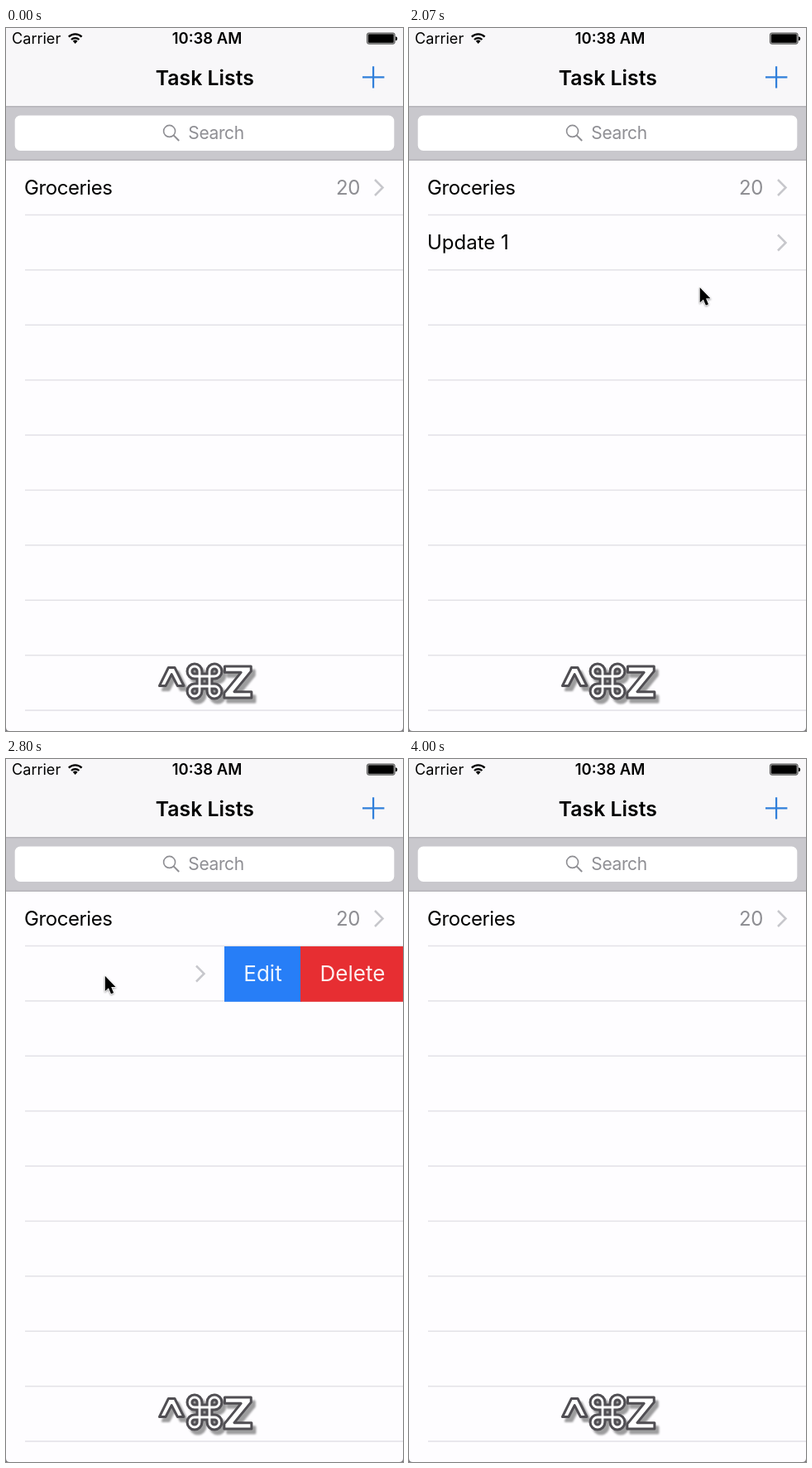
Recreate the animation shown at these times as an HTML page. Size 480 by 848 pixels, loop 4.54 s.

```html
<!DOCTYPE html>
<html lang="en">
<head>
<meta charset="utf-8">
<title>Task Lists</title>
<style>
  html, body { margin: 0; width: 100%; height: 100%; overflow: hidden; background: #fefdff; }
  svg { display: block; width: 100vw; height: 100vh; }
  text { font: 400 24px Inter, Roboto, sans-serif; letter-spacing: -.018em; }
  .title { font-weight: 600; font-size: 24.8px; letter-spacing: 0; }
  .status { font-size: 18.1px; letter-spacing: 0; }
  .clock { font-weight: 600; font-size: 18.5px; }
  .hint { font-size: 21px; fill: #8e8e93; }
  .count { fill: #8e8e93; }
  .action { font-size: 26px; letter-spacing: 0; fill: #fff; fill-opacity: .92; }
  .mid { text-anchor: middle; }
  .end { text-anchor: end; }
  .chevron { fill: none; stroke: #c7c7cc; stroke-width: 2.5; }
  .keys { filter: drop-shadow(4px 5px .8px rgba(0, 0, 0, .38)); }
  .glyph { fill: #fff; stroke: #504e53; stroke-width: 3; stroke-linejoin: round; }
  .keys text { font: 700 52px "DejaVu Sans", sans-serif; letter-spacing: 0; }
  #cursor { filter: drop-shadow(0 1.5px 1.2px rgba(0, 0, 0, .4)); }
</style>
</head>
<body>
<svg viewBox="0 0 480 848" preserveAspectRatio="none">
  <defs>
    <path id="chev" class="chevron" d="M-5 -9.5L4.5 0L-5 9.5"/>
    <clipPath id="reveal"><rect id="gap" x="480" y="220" width="480" height="80"/></clipPath>
  </defs>

  <rect width="480" height="848" fill="#fefdff"/>

  <!-- status and navigation bars -->
  <rect width="480" height="94" fill="#f8f7f9"/>
  <text class="status" x="7" y="19">Carrier</text>
  <g fill="none" stroke="#000" stroke-width="2.3">
    <path d="M75.8 10.6A11.4 11.4 0 0 1 91.6 10.6"/>
    <path d="M79 14A6.8 6.8 0 0 1 88.4 14"/>
  </g>
  <path d="M80.8 15.8A4.2 4.2 0 0 1 86.6 15.8L83.7 19Z"/>
  <text class="status clock mid" x="243" y="19">10:38 AM</text>
  <rect x="436.5" y="6" width="33.6" height="13.2" rx="2" fill="#999" stroke="#555"/>
  <rect x="438" y="7.5" width="30.6" height="10.2" rx="1"/>
  <path d="M471 10.2q2.2 0 2.2 2.5t-2.2 2.5z"/>
  <text class="title mid" x="240.3" y="69">Task Lists</text>
  <path d="M431 59.4H457.4M444.1 46.2V72.6" stroke="#2f7fda" stroke-width="2.2"/>

  <!-- search bar -->
  <rect y="94" width="480" height="66" fill="#c9c8cd"/>
  <path d="M0 94.7H480M0 159.3H480" stroke="#b5b4b9" stroke-width="1.4"/>
  <rect x="10.7" y="105.5" width="458.6" height="42.5" rx="6.5" fill="#fff"/>
  <g fill="none" stroke="#8e8e93" stroke-width="1.6">
    <circle cx="197.6" cy="124.4" r="7"/>
    <path d="M202.6 129.4L209.2 136" stroke-width="2"/>
  </g>
  <text class="hint" x="220.3" y="133.6">Search</text>

  <!-- list -->
  <g id="lines" fill="#e3e2e7"></g>
  <text x="22" y="201">Groceries</text>
  <text class="count end" x="428" y="201">20</text>
  <use href="#chev" x="451" y="192.5"/>

  <g id="row">
    <g clip-path="url(#reveal)">
      <rect x="264" y="226" width="93" height="66.8" fill="#277ef7"/>
      <rect x="356" y="226" width="124" height="66.8" fill="#e72e32"/>
      <text class="action mid" x="310.5" y="268.3">Edit</text>
      <text class="action mid" x="419" y="268.3">Delete</text>
    </g>
    <g id="cell">
      <text x="22" y="267.4" style="letter-spacing: 0">Update 1</text>
      <use href="#chev" x="451" y="259"/>
    </g>
  </g>

  <!-- pressed keys -->
  <g class="keys">
    <path class="glyph" d="M185.5 793.5L196.4 771.5H204L215 793.5H207.4L200.2 779.6L193 793.5Z"/>
    <g fill="none" stroke="#504e53" stroke-width="9">
      <path id="loop" d="M234 776a6 6 0 1 0 -6 6H252a6 6 0 1 0 -6 -6V800a6 6 0 1 0 6 -6H228a6 6 0 1 0 6 6Z"/>
      <use href="#loop" stroke="#fff" stroke-width="2.8"/>
    </g>
    <text class="glyph" x="261.5" y="808">Z</text>
  </g>

  <path id="cursor" d="M.8 1.8V20L5 16.2L8 23.2L11.1 21.9L8.2 15H13.6Z"
        stroke="#fff" stroke-width="1.4" stroke-linejoin="round" paint-order="stroke"/>

  <path d="M0 848V843.5Q0 848 4.5 848ZM480 848V843.5Q480 848 475.5 848Z" fill="#77757a"/>
</svg>

<script>
  const LOOP = 4540, TICK = 1000 / 15;
  const OPEN = -216;                    // cell shift that shows both buttons
  const DRAG = { from: 36, to: 41.5, origin: 337.5 };
  const $ = id => document.getElementById(id);

  const clamp = (v, lo = 0, hi = 1) => Math.min(hi, Math.max(lo, v));
  const smooth = k => k * k * (3 - 2 * k);
  const easeOut = k => 1 - (1 - k) ** 3;

  // Pointer moves, times in ticks
  const moves = [
    { from: 22, to: 25, x: 332, y: 473, ease: smooth },
    { from: 28, to: 36, x: 357, y: 259, ease: easeOut },
    { from: DRAG.from, to: DRAG.to, x: 119, y: 260, ease: smooth },
    { from: 42.5, to: 47, x: 449, y: 260, ease: smooth },
    { from: 52, to: 60, x: 330, y: 812, ease: smooth }
  ];

  function pointer(n) {
    let x = 257, y = 828;
    for (const m of moves) {
      const k = m.ease(clamp((n - m.from) / (m.to - m.from)));
      x += (m.x - x) * k;
      y += (m.y - y) * k;
    }
    return { x, y };
  }

  function draw(time) {
    const n = Math.floor((time % LOOP + 5) / TICK);
    const { x, y } = pointer(n);
    const held = pointer(clamp(n, DRAG.from, DRAG.to)).x;
    const shift = clamp(held - DRAG.origin, OPEN, 0);
    const shown = Math.min(clamp((n - 16) / 4), clamp((50 - n) / 3));

    $('row').setAttribute('opacity', shown);
    $('cell').setAttribute('transform', `translate(${shift} 0)`);
    $('gap').setAttribute('x', 480 + shift);
    $('cursor').setAttribute('transform', `translate(${x} ${y})`);
    $('cursor').setAttribute('visibility', n >= 22 && n < 60 ? 'visible' : 'hidden');
  }

  for (let i = 0; i < 10; i++) {
    const line = document.createElementNS('http://www.w3.org/2000/svg', 'rect');
    const box = { x: 23, y: 224.7 + i * 66.4, width: 457, height: 1.5 };
    for (const key in box) line.setAttribute(key, box[key]);
    $('lines').append(line);
  }

  const start = performance.now();
  function frame() {
    draw(performance.now() - start);
    requestAnimationFrame(frame);
  }
  frame();
</script>
</body>
</html>
```
